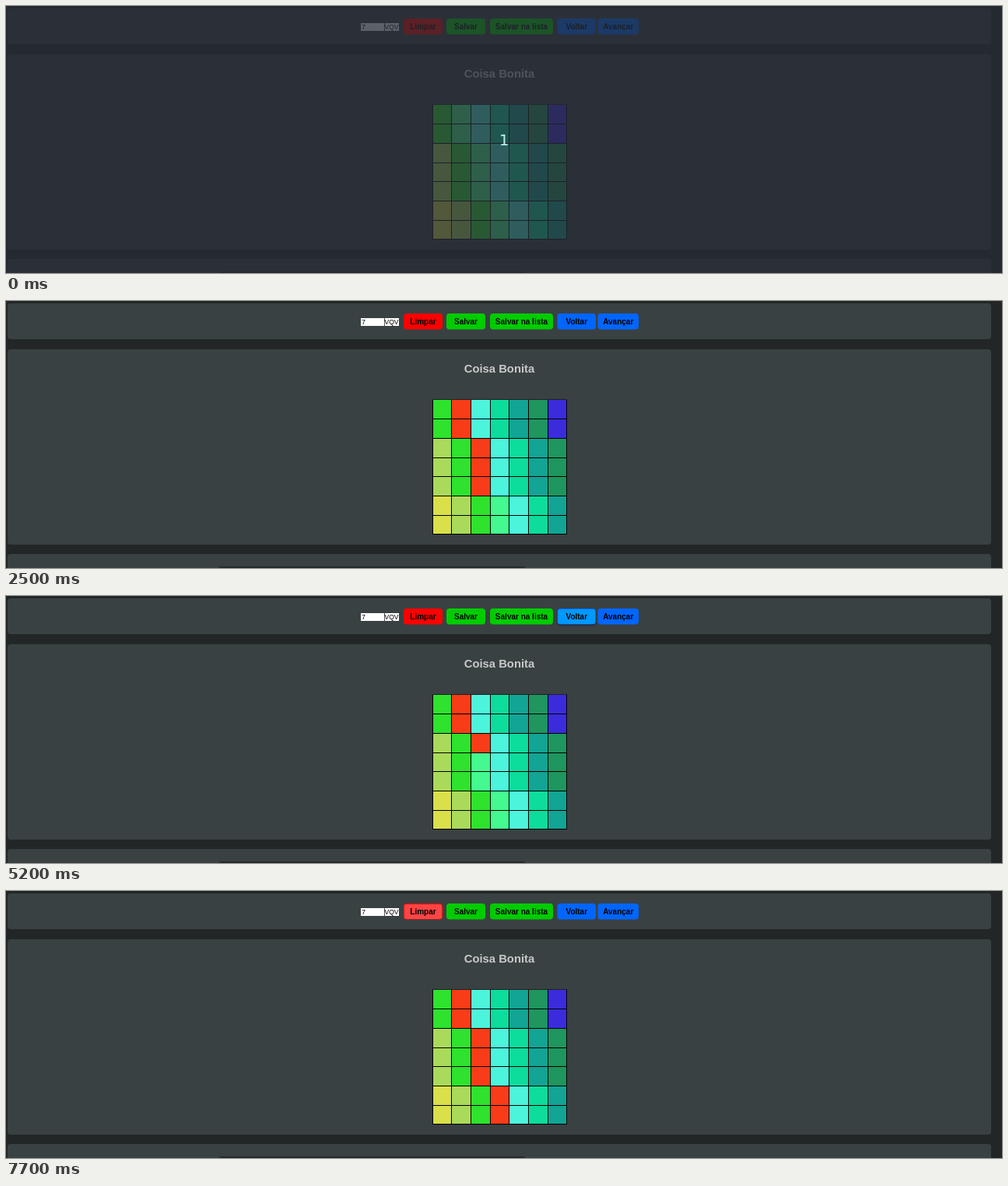
An HTML page with a canvas that plays this animation: 1280x343 px, repeating every 8000 ms.

```html
<!DOCTYPE html>
<html lang="pt">
<head>
<meta charset="utf-8">
<title>Coisa Bonita</title>
<style>
  html, body { margin: 0; width: 100%; height: 100%; overflow: hidden; background: #222626; }
  canvas { display: block; }
</style>
</head>
<body>
<canvas id="stage" width="1280" height="343"></canvas>
<script>
const ctx = document.getElementById('stage').getContext('2d');
const LOOP = 8000;
const SANS = '"Liberation Sans", Arial, sans-serif';
const PAGE = '#222626', PANEL = '#3a4143', RED = '#f93c18';

// Diagonal palette; each row starts at a different entry.
const PALETTE = ['#d9e04a', '#aada5a', '#2ee22e', '#44fa90', '#4cf4dc',
                 '#0cdc9c', '#12a494', '#1e965e', '#3a2cdc'];
const MARKED = 3;
const GRID = { x: 548.5, y: 127.45, pitch: 24.7, size: 7 };

const BUTTONS = [
  { label: 'Limpar', x: 511, w: 50, color: '#ff0000', hover: '#ff4444' },
  { label: 'Salvar', x: 566, w: 50, color: '#00cc00' },
  { label: 'Salvar na lista', x: 622, w: 81, color: '#00cc00' },
  { label: 'Voltar', x: 708.5, w: 49.5, color: '#0066ff', hover: '#0099ff' },
  { label: 'Avançar', x: 760.5, w: 52.5, color: '#0066ff', hover: '#0099ff' }
];

const PAINT_TIMES = [1000, 1300, 1800, 2200, 2500, 3000, 3700];
const UNDO = { first: 4500, step: 200, count: 5 };
const REDO = { first: 5900, step: 200, count: 5 };

function clicks(run, t) {
  const n = Math.floor((t - run.first) / run.step) + 1;
  return Math.max(0, Math.min(run.count, n));
}

function markedRows(t) {
  const painted = PAINT_TIMES.filter(p => t >= p).length;
  return painted - clicks(UNDO, t) + clicks(REDO, t);
}

function hovered(t) {
  if (t >= 7700) return 'Limpar';
  if (t >= 5500 && t < 7200) return 'Avançar';
  if (t >= 4200 && t < 5500) return 'Voltar';
  return '';
}

// The button is held for the 100 ms before each click.
function pressed(t) {
  const run = t < 5500 ? UNDO : REDO;
  const held = clicks(run, t + 100) > clicks(run, t);
  return held && !(run === UNDO && t < UNDO.first);
}

function box(x, y, w, h, r, color) {
  ctx.fillStyle = color;
  ctx.beginPath();
  ctx.roundRect(x, y, w, h, r);
  ctx.fill();
}

function text(str, x, y, font, color, align = 'center') {
  ctx.font = font;
  ctx.fillStyle = color;
  ctx.textAlign = align;
  ctx.fillText(str, x, y);
}

function drawPage() {
  ctx.fillStyle = PAGE;
  ctx.fillRect(0, 0, 1280, 343);
  box(2, 3, 1264, 46, 4, PANEL);
  box(2, 62, 1264, 251, 4, PANEL);
  box(2, 325, 1264, 40, 4, PANEL);
  box(273, 341, 395, 20, 4, '#24292a');
  text('Coisa Bonita', 634, 92, 'bold 14.8px ' + SANS, '#c8c8c8');
}

function drawInputs() {
  box(456, 22, 49, 10, 0, '#ffffff');
  box(486, 22, 1, 10, 0, '#555555');
  text('7', 457, 30, '9px ' + SANS, '#000000', 'left');
  text('VQV', 495.5, 30.2, '8.5px ' + SANS, '#000000');
}

function drawButton(b, isOver, isDown) {
  ctx.save();
  if (isDown) {
    ctx.shadowColor = 'rgba(0, 0, 0, 0.5)';
    ctx.shadowBlur = 2;
    ctx.shadowOffsetY = 1;
  }
  box(b.x, 16, b.w, 20.5, 4, b.color);
  ctx.restore();
  if (isOver) box(b.x + 0.7, 17, b.w - 1.4, 19, 3, b.hover);
  text(b.label, b.x + b.w / 2, 30, 'bold 10px ' + SANS, '#000000');
}

function drawGrid(rows) {
  const { x, y, pitch, size } = GRID;
  const edge = (start, i) => Math.round(start + pitch * i);
  box(548, 126.5, 173, 173.5, 0, '#000000');
  for (let r = 0; r < size; r++) {
    const start = 2 - (r > 1) - (r > 4);
    for (let c = 0; c < size; c++) {
      const left = edge(x, c), top = edge(y, r);
      const w = edge(x, c + 1) - left - 1;
      const h = edge(y, r + 1) - top - 1;
      const k = start + c;
      box(left, top, w, h, 0, k === MARKED && r < rows ? RED : PALETTE[k]);
    }
  }
}

function drawCountdown() {
  ctx.fillStyle = 'rgba(38, 43, 52, 0.75)';
  ctx.fillRect(0, 0, 1280, 343);
  text('1', 640, 178.5, '20px "DejaVu Sans", sans-serif', '#b8f2f0');
}

function draw(t) {
  const over = hovered(t), down = pressed(t);
  drawPage();
  drawInputs();
  for (const b of BUTTONS) {
    const isOver = b.label === over;
    drawButton(b, isOver, isOver && down);
  }
  drawGrid(markedRows(t));
  if (t < 100) drawCountdown();
}

const begin = performance.now();
function frame() {
  draw((performance.now() - begin) % LOOP);
  requestAnimationFrame(frame);
}
frame();
</script>
</body>
</html>
```
